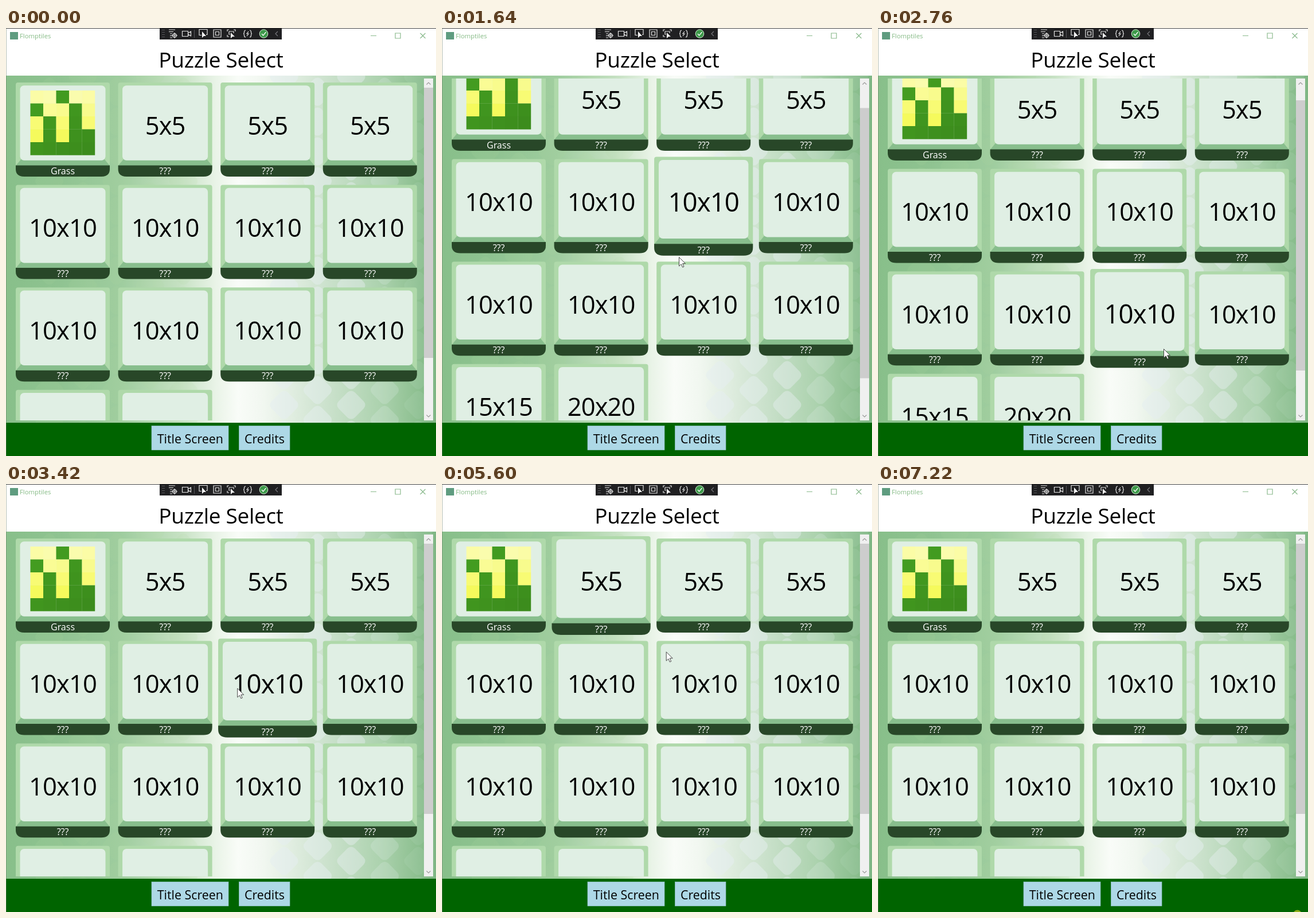
An HTML page that plays this animation: 750x746 px, repeating every 7250 ms.

```html
<!DOCTYPE html>
<html lang="en">
<head>
<meta charset="utf-8">
<title>Puzzle Select</title>
<style>
  html, body { margin: 0; width: 100%; height: 100%; overflow: hidden; background: #fff; }
  svg { display: block; width: 100%; height: 100%; }
  text { font-family: "Open Sans", "Noto Sans", sans-serif; }
  .mid { text-anchor: middle; }
  .size { font-size: 43.5px; letter-spacing: -0.9px; }
  .label { font-size: 16px; fill: #fff; }
  .line { fill: none; stroke-width: 1.2; }
</style>
</head>
<body>
<svg viewBox="0 0 750 746" xmlns="http://www.w3.org/2000/svg">
  <defs>
    <linearGradient id="sky">
      <stop offset="0" stop-color="#88bf8a"/>
      <stop offset=".12" stop-color="#8fc391"/>
      <stop offset=".27" stop-color="#9fcd9f"/>
      <stop offset=".4" stop-color="#c4e0c1"/>
      <stop offset=".49" stop-color="#eaf4e8"/>
      <stop offset=".54" stop-color="#f9fcf8"/>
      <stop offset=".6" stop-color="#f1f7f0"/>
      <stop offset=".72" stop-color="#d2e5d3"/>
      <stop offset=".87" stop-color="#acd2ae"/>
      <stop offset=".96" stop-color="#8cbf8f"/>
      <stop offset="1" stop-color="#7fb684"/>
    </linearGradient>
    <clipPath id="area"><rect y="83" width="750" height="605"/></clipPath>
    <clipPath id="view"><rect x="5" y="88" width="724" height="596"/></clipPath>
  </defs>

  <rect width="750" height="746" fill="#fff"/>
  <rect x="7" y="7" width="14" height="13" fill="#5f9c80"/>
  <text x="24" y="18" font-size="11.3" fill="#86bb86">Flomptiles</text>
  <path class="line" stroke="#8aba8c" d="M636 13.5h10M679 9h9v9h-9zM722.500 9l9 9m0-9l-9 9"/>
  <text class="mid" x="375" y="69" font-size="37" letter-spacing="-0.3">Puzzle Select</text>
  <path stroke="#444" d="M0 .5H750"/>

  <g id="tools">
    <rect x="268" width="213" height="20" fill="#202022"/>
    <path stroke="#55555a" stroke-width="5" stroke-dasharray="1 3" d="M274.500 3v15"/>
    <path stroke="#55555a" d="M328.500 3v14"/>
    <g class="line" stroke="#e4e4e4">
      <path d="M284 3h11M284 6.500h8M286 10h4M286 13.500h4M286 17h4"/>
      <circle cx="294" cy="13" r="3.200"/><path d="M294 8v10M289 13h10"/>
      <path d="M307.500 5.500h10v9h-10zM317.500 9l5-3v8l-5-3"/>
      <path d="M341 12.500h-4v-10h14v9h-2"/>
      <path d="M362 3h13v13h-13zM365.500 6.500h6v6h-6z"/>
      <path d="M386 6V3h3M397 3h3v3M386 12v3h3M389 6h8v3M389 6v5h2"/>
      <path d="M418 4q-2.500 0-2.500 3t-1.500 3q1.500 0 1.500 3t2.500 3M425 4q2.500 0 2.500 3t1.500 3q-1.500 0-1.500 3t-2.500 3M423 6l-3 4h3l-3 4"/>
    </g>
    <path fill="#fff" d="M342 6v11l3-3h4zM392 8v10l3-3h4z"/>
    <circle cx="449.500" cy="10" r="7.300" fill="#3d9a4a" stroke="#d8efd8"/>
    <path class="line" stroke="#fff" stroke-width="2" d="M446 10l2.500 3 5-6"/>
    <path class="line" stroke="#77777c" d="M474 6l-4 4 4 4"/>
  </g>

  <g clip-path="url(#area)">
    <rect y="83" width="750" height="605" fill="url(#sky)"/>
    <g id="gems"></g>
  </g>

  <g clip-path="url(#view)"><g id="list"></g></g>

  <rect x="729" y="88" width="16" height="596" fill="#f0f0f0"/>
  <rect id="thumb" x="729" width="16" height="471" fill="#cdcdcd"/>
  <path class="line" stroke="#9a9a9a" d="M733.500 98.500l3.500-3.500 3.500 3.500M733.500 674.500l3.500 3.500 3.500-3.500"/>

  <rect y="688" width="750" height="58" fill="#006400"/>
  <g fill="#add8e6" stroke="#94c4cc" stroke-width=".7">
    <rect x="254" y="693.500" width="134" height="42"/>
    <rect x="406.500" y="693.500" width="88.500" height="42"/>
  </g>
  <text class="mid" x="321.300" y="724" font-size="21.400">Title Screen</text>
  <text class="mid" x="451" y="724" font-size="21.400">Credits</text>

  <path stroke="#6b7d6b" stroke-width=".6" d="M.3 0V746"/>
  <circle id="spot" cx="731.500" cy="750" r="7.500" fill="#8fae1c"/>
  <path id="cursor" fill="#fff" stroke="#333" stroke-width=".9" stroke-linejoin="round"
        d="M.5 .5V16L4.200 12.600L6.600 18L9 17L6.600 11.600H11.500Z"/>
</svg>
<script>
const LOOP = 7250, STEP = 178.6, SIDE = 164, LEFT = 17, TOP = 95;
const $ = id => document.getElementById(id);

function add(parent, tag, attrs, content) {
  const el = document.createElementNS('http://www.w3.org/2000/svg', tag);
  for (const key in attrs) el.setAttribute(key, attrs[key]);
  if (content) el.textContent = content;
  parent.appendChild(el);
  return el;
}

// Diamond lattice behind the list
for (let col = -7; col < 5; col++) {
  for (let row = 0; row < 13; row++) {
    const x = 485 + col * 58.5;
    const y = 85 + row * 52 + (col & 1 ? 26 : 0);
    const right = col >= 0;
    add($('gems'), 'rect', {
      x: -20, y: -20, width: 40, height: 40, rx: 9,
      transform: `translate(${x} ${y}) rotate(45)`,
      fill: right ? '#e6eff0' : '#a9d69c',
      opacity: right ? [.55, .5, .42, .2, .08][col] : col < -2 ? .12 : 0
    });
  }
}

function drawGrass(parent) {
  const rows = ['..#..', '#..#.', '.#.#.', '.#.##', '#####'];
  rows.forEach((line, r) => [...line].forEach((c, i) => add(parent, 'rect', {
    x: 25.5 + i * 22.5, y: 14 + r * 22.5, width: 22.7, height: 22.7,
    fill: c === '#'
      ? `hsl(103 66% ${37.5 - r * .6 - i * .5}%)`
      : `hsl(${61 + (i + r) % 2} 94% ${82 - r * 5 + i % 2 * 1.5}%)`
  })));
}

function makeCard(index) {
  const col = index % 4, row = Math.floor(index / 4);
  const el = add($('list'), 'g', {});
  add(el, 'path', { fill: '#afd9aa', d: 'M0 150V4q0-4 4-4H160q4 0 4 4V150z' });
  add(el, 'path', { fill: '#88be8d', d: 'M0 145L10 133H154L164 145z' });
  add(el, 'rect', { x: 7.5, y: 5.2, width: 149, height: 130.6, rx: 7, fill: '#e0efe4' });
  add(el, 'path', { fill: '#284728', d: 'M0 144.500H164V151q0 13-15 13H15q-15 0-15-13z' });
  if (index) {
    const n = row === 0 ? 5 : row < 3 ? 10 : 15 + col * 5;
    add(el, 'text', { class: 'mid size', x: 82, y: 90.5 }, `${n}x${n}`);
  } else {
    drawGrass(el);
  }
  add(el, 'text', { class: 'mid label', x: 82, y: 160 }, index ? '???' : 'Grass');
  return { el, x: LEFT + col * STEP, y: TOP + row * STEP };
}
const cards = Array.from({ length: 14 }, (_, i) => makeCard(i));

// Pointer path: time, x, y
const path = [
  [170, 724, 754], [420, 605, 618], [650, 500, 498], [930, 418, 404], [1020, 413, 399],
  [1800, 413, 399], [2110, 516, 538], [2320, 498, 559],
  [3100, 498, 559], [3380, 420, 385], [3620, 290, 225], [3840, 123, 196],
  [4890, 123, 196], [5150, 470, 520], [5440, 290, 170], [5560, 345, 245], [5600, 390, 291],
  [5760, 470, 480], [5960, 300, 190], [6160, 290, 420], [6350, 300, 716], [6940, 335, 750]
];
const wheel = [[1610, 45], [1700, 90], [1790, 118], [2420, 73], [2560, 28], [2790, 0]];

const slope = (i, k) => path[i] && path[i + 1]
  ? (path[i + 1][k] - path[i][k]) / (path[i + 1][0] - path[i][0]) : 0;

function tangent(i, k) {
  const a = slope(i - 1, k), b = slope(i, k);
  return a * b > 0 ? 2 * a * b / (a + b) : 0;
}

// Monotone cubic through the path points
function pointer(t) {
  const last = path.length - 1;
  if (t <= path[0][0]) return path[0].slice(1);
  if (t >= path[last][0]) return path[last].slice(1);
  const i = path.findIndex(p => p[0] > t) - 1;
  const h = path[i + 1][0] - path[i][0], u = (t - path[i][0]) / h, v = 1 - u;
  return [1, 2].map(k =>
    path[i][k] * v * v * (1 + 2 * u) + tangent(i, k) * h * u * v * v +
    path[i + 1][k] * u * u * (3 - 2 * u) - tangent(i + 1, k) * h * u * u * v);
}

const scrollAt = t => wheel.reduce((pos, [at, to]) => t >= at ? to : pos, 0);

function isOver(card, t) {
  const [x, y] = pointer(t), top = card.y - scrollAt(t);
  return y > 88 && y < 684 && x > card.x && x < card.x + SIDE && y > top && y < top + SIDE;
}

// Hover growth trails the pointer a little
function growth(card, t) {
  let hits = 0;
  for (let k = 0; k < 6; k++) hits += isOver(card, t - 40 - k * 14);
  return hits / 6;
}

function render(t) {
  const scroll = scrollAt(t), [x, y] = pointer(t);
  for (const card of cards) {
    const s = 1 + .05 * growth(card, t), shift = SIDE / 2 * (1 - s);
    card.el.setAttribute('transform',
      `translate(${card.x + shift} ${card.y - scroll + shift}) scale(${s})`);
  }
  $('thumb').setAttribute('y', 104 + scroll * .788);
  $('cursor').setAttribute('transform', `translate(${x} ${y})`);
  $('spot').setAttribute('visibility', t >= 7220 ? 'visible' : 'hidden');
}

const start = performance.now();
function tick() {
  render((performance.now() - start) % LOOP);
  requestAnimationFrame(tick);
}
tick();
</script>
</body>
</html>
```
